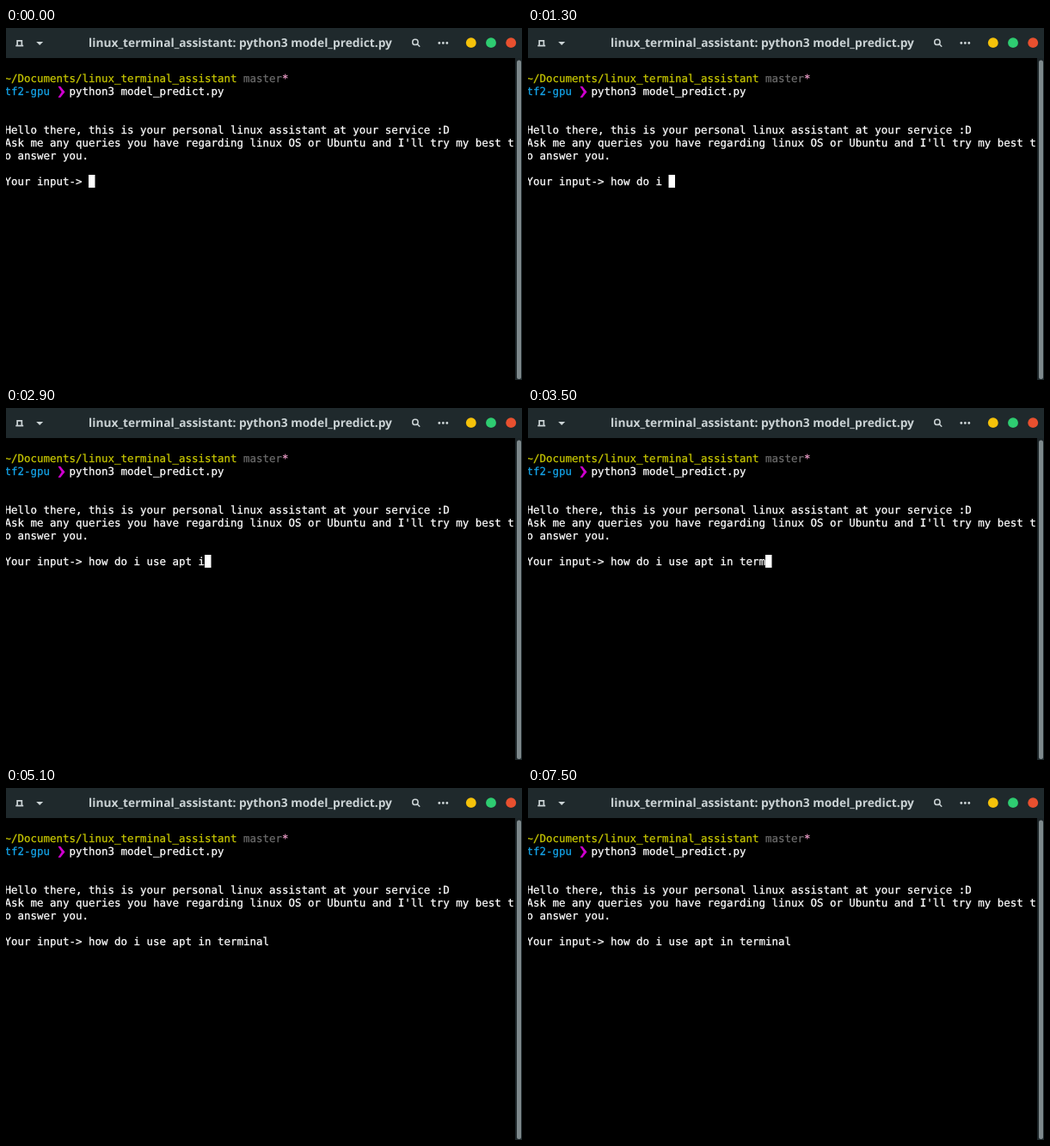
An HTML page for the animation above (8000 ms loop, 600 by 410 pixels).

```html
<!DOCTYPE html>
<html lang="en">
<head>
<meta charset="utf-8">
<title>Terminal assistant</title>
<style>
  html, body { margin: 0; width: 100%; height: 100%; overflow: hidden; background: #000; }
  svg { display: block; width: 600px; height: 410px; }
  text { white-space: pre; text-rendering: geometricPrecision; }
  .mono { font: 12.46px "DejaVu Sans Mono", monospace; color: #fff; }
  .mono text { fill: currentColor; stroke: currentColor; stroke-width: 0.25px; }
  .title { font: 700 13.75px "Open Sans", "Noto Sans", sans-serif; fill: #cbd3d5; }
</style>
</head>
<body>
<svg viewBox="0 0 600 410">
  <rect width="600" height="410" fill="#000"/>
  <rect x="592" y="35" width="8" height="375" fill="#1d2629"/>
  <rect x="594" y="37.5" width="5" height="371.5" rx="2.5" fill="#7e898c"/>

  <rect width="600" height="35" fill="#1f292c"/>
  <g fill="#cbd3d5">
    <path d="M12.3 14h6.9v5.8h1v1.7h-8.9v-1.7h1zM14 15.7v4.1h3.5v-4.1z" fill-rule="evenodd"/>
    <path d="M35.2 16h8L39.2 20z"/>
    <circle cx="503.8" cy="17.5" r="1.4"/>
    <circle cx="508.3" cy="17.5" r="1.4"/>
    <circle cx="512.8" cy="17.5" r="1.4"/>
  </g>
  <g fill="none" stroke="#cbd3d5" stroke-width="1.5">
    <circle cx="475.9" cy="16.4" r="3.2"/>
    <path d="M478.2 18.7l3 3"/>
  </g>
  <circle cx="540.8" cy="17.2" r="5.9" fill="#f5c20a"/>
  <circle cx="564" cy="17.2" r="5.9" fill="#2ecc71"/>
  <circle cx="587.2" cy="17.2" r="5.9" fill="#e8502f"/>
  <text class="title" x="96" y="22">linux_terminal_assistant: python3 model_predict.py</text>

  <path d="M60.5 68h2.8l5.2 6.5-5.2 6.5h-2.8l4.2-6.5z" fill="#cd00cd"/>
  <g id="screen" class="mono"></g>
  <rect id="cursor" width="7.5" height="15" fill="#fff"/>
</svg>
<script>
const LOOP = 8000, ENTER = 4500, BLINK = 600;
const CELL = 7.5, LINE = 15, LEFT = -1.5, TOP = 51;
const PROMPT = "Your input-> ", QUERY = "how do i use apt in terminal";
const INPUT_ROW = 8;

// [time in ms, characters typed so far]
const KEYS = [
  [100, 1], [300, 3], [500, 4], [900, 5], [1000, 7], [1200, 8], [1300, 9],
  [1500, 10], [1700, 12], [1900, 13], [2300, 14], [2500, 15], [2600, 16],
  [2700, 17], [2900, 18], [3000, 19], [3100, 20], [3300, 21], [3400, 23],
  [3500, 24], [3700, 25], [3800, 27], [3900, 28]
];

const screen = document.getElementById("screen");
const cursor = document.getElementById("cursor");
const colX = col => LEFT + col * CELL;
const rowY = row => TOP + row * LINE;

function print(row, col, content, color) {
  const el = document.createElementNS("http://www.w3.org/2000/svg", "text");
  el.setAttribute("x", colX(col));
  el.setAttribute("y", rowY(row) + 12.3);
  if (color) el.style.color = color;
  el.textContent = content;
  screen.append(el);
  return el;
}

print(0, 0, "~/Documents/linux_terminal_assistant", "#c8c800");
print(0, 37, "master", "#6c6c6c");
print(0, 43, "*", "#f0a0cc");
print(1, 0, "tf2-gpu", "#14a5ea");
print(1, 10, "python3 model_predict.py");
print(4, 0, "Hello there, this is your personal linux assistant at your service :D");
print(5, 0, "Ask me any queries you have regarding linux OS or Ubuntu and I'll try my best t");
print(6, 0, "o answer you.");
const input = print(INPUT_ROW, 0, PROMPT);

function draw(t) {
  let typed = 0;
  for (const [at, count] of KEYS) if (t >= at) typed = count;
  const line = PROMPT + QUERY.slice(0, typed);
  if (input.textContent !== line) input.textContent = line;

  const sent = t >= ENTER;
  const visible = !sent || Math.floor((t - ENTER) / BLINK) % 2 === 0;
  cursor.setAttribute("x", colX(sent ? 0 : line.length));
  cursor.setAttribute("y", rowY(INPUT_ROW + (sent ? 1 : 0)));
  cursor.setAttribute("visibility", visible ? "visible" : "hidden");
}

const start = performance.now();
function tick() {
  draw((performance.now() - start) % LOOP);
  requestAnimationFrame(tick);
}
tick();
</script>
</body>
</html>
```
